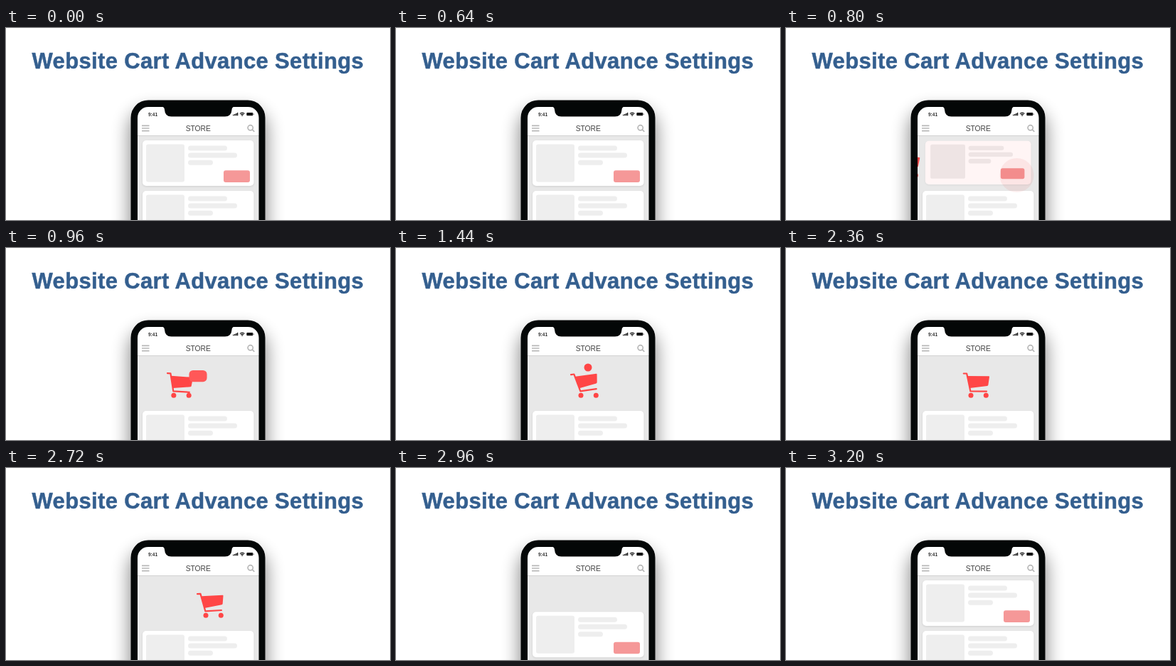
An HTML page that plays this animation: 540x270 px, repeating every 3400 ms.

```html
<!DOCTYPE html>
<html lang="en">
<head>
<meta charset="utf-8">
<title>Website Cart Advance Settings</title>
<style>
  html, body { margin: 0; width: 100%; height: 100%; overflow: hidden; background: #fff; }
  svg { display: block; width: 540px; height: 270px; font-family: "Liberation Sans", Arial, sans-serif; }
  #itemContent { mix-blend-mode: multiply; }
</style>
</head>
<body>
<svg viewBox="0 0 540 270">
  <defs>
    <clipPath id="screen"><rect x="185" y="111" width="170.5" height="200" rx="15"/></clipPath>
    <filter id="glow" x="-40%" y="-40%" width="180%" height="180%"><feGaussianBlur stdDeviation="13"/></filter>
    <filter id="soft" x="-10%" y="-15%" width="120%" height="130%"><feGaussianBlur stdDeviation="1.5"/></filter>
    <g id="content">
      <g fill="#eee">
        <rect x="197" y="163.5" width="54" height="53" rx="3"/>
        <rect x="256" y="165.5" width="55" height="7" rx="3.5"/>
        <rect x="256" y="175.5" width="69" height="7" rx="3.5"/>
        <rect x="256" y="185.8" width="35" height="7" rx="3.5"/>
      </g>
      <rect x="306" y="200.3" width="37" height="16.7" rx="3" fill="#f59898"/>
    </g>
    <g id="card">
      <rect x="192" y="159" width="156.5" height="64" rx="5" opacity=".1" filter="url(#soft)"/>
      <rect x="192" y="158" width="156.5" height="64" rx="5" fill="#fff"/>
      <use href="#content"/>
    </g>
  </defs>

  <text x="36.5" y="57" font-size="31" font-weight="700" letter-spacing=".35" fill="#345f8f" stroke="#345f8f" stroke-width=".5">Website Cart Advance Settings</text>

  <rect x="174" y="116" width="192" height="220" rx="26" opacity=".48" filter="url(#glow)"/>
  <rect x="175.5" y="101.5" width="189" height="220" rx="24.5" fill="#040707"/>

  <g clip-path="url(#screen)">
    <rect x="184" y="110" width="172" height="160" fill="#e8e8e8"/>
    <g id="list">
      <use href="#card" y="71"/>
      <use href="#card" y="142"/>
    </g>
    <rect id="shade" filter="url(#soft)"/>
    <g id="cart" fill="#ff4646">
      <g id="basket">
        <path d="M249.8 176.5H254.2L259.4 201.4L282 201.6" fill="none" stroke="#ff4646" stroke-width="2.2" stroke-linecap="round" stroke-linejoin="round"/>
        <path d="M255.5 180L285.2 180.4Q286.2 180.5 286 181.5L284.4 192.6Q284.2 193.8 283 194L258.5 197Z"/>
      </g>
      <circle cx="260" cy="207.3" r="3.5"/>
      <circle cx="281.3" cy="207.3" r="3.5"/>
    </g>
    <rect id="item"/>
    <use id="itemContent" href="#content"/>
    <circle id="ripple" cx="324.500" cy="207" fill="#e05858"/>

    <rect x="184" y="110" width="172" height="41.5" fill="#fff"/>
    <rect x="184" y="151" width="172" height="1" fill="#d2d2d2"/>
  </g>

  <path d="M218 110Q222.800 110.800 223 115Q223.500 124.500 232.500 124.500H308Q317 124.500 317.500 115Q317.700 110.800 322.500 110Z" fill="#040707"/>
  <text x="200" y="124.300" font-size="6.500" font-weight="700" fill="#333">9:41</text>
  <path d="M319.700 123.300V121.800M321.700 123.300V121M323.700 123.300V120M325.600 123.300V118.900" stroke="#111" stroke-width="1.400"/>
  <g fill="none" stroke="#111" stroke-width="1.200">
    <path d="M329 120.500Q332.200 117.700 335.400 120.500M330.300 122Q332.200 120.400 334.100 122"/>
    <circle cx="332.200" cy="123.100" r=".3"/>
  </g>
  <rect x="338.300" y="119" width="9" height="4.300" rx="1" fill="#111"/>
  <rect x="347.800" y="120.400" width=".8" height="1.600" fill="#555"/>
  <g fill="none" stroke="#b8b8b8" stroke-width="1.700">
    <path d="M191 137.300H201.500M191 141H201.500M191 144.700H201.500"/>
    <circle cx="343.700" cy="140.300" r="3.600"/>
    <path d="M346.300 142.900L349.300 145.900"/>
  </g>
  <text x="270.300" y="144.500" font-size="10.300" text-anchor="middle" fill="#444">STORE</text>
</svg>
<script>
  const LOOP = 3400, STEP = 40;
  const el = id => document.getElementById(id);
  const set = (id, attrs) => {
    for (const name in attrs) el(id).setAttribute(name, attrs[name]);
  };
  const clamp = v => Math.min(1, Math.max(0, v));
  const span = (t, from, to) => clamp((t - from) / (to - from));
  const mix = (a, b, p) => a + (b - a) * p;
  const inOut = (p, n) => p < .5 ? (2 * p) ** n / 2 : 1 - (2 - 2 * p) ** n / 2;

  // [time, degrees] of the basket
  const TILTS = [[640, 4], [960, 3], [1200, 7], [1420, -9], [1600, 3], [1760, -2],
    [1960, 0], [2040, -3.5], [2160, 2], [2280, 0], [2320, 0], [2720, -4], [2920, -8]];

  function tiltAt(t) {
    const i = TILTS.findIndex(key => key[0] > t);
    if (i < 1) return TILTS[i ? TILTS.length - 1 : 0][1];
    const [t0, a] = TILTS[i - 1], [t1, b] = TILTS[i];
    return mix(a, b, inOut(span(t, t0, t1), 2));
  }

  function cartX(t) {
    if (t < 1160) return -99 * ((1160 - t) / 360) ** 2.4;
    if (t < 1400) return 3 * Math.sin(Math.PI * span(t, 1160, 1400));
    return 21 * (Math.max(0, t - 2480) / 240) ** 3;
  }

  // Vertical shift of the ball: drops into the basket, then is tossed once.
  function ballShift(t) {
    if (t < 1307) return 9 * span(t, 1140, 1300) ** 2;
    return Math.min(9, -20.5 + 9.5 * ((t - 1630) / 190) ** 2);
  }

  function draw(t) {
    const p = inOut(span(t, 640, 1140), 5);
    const left = mix(192, 264.5, p), right = mix(348.5, 275.5, p);
    const top = mix(158, 173.5, p), bottom = mix(222, 184.5, p);
    const tint = mix(255, 70, p);
    const box = { x: left, width: right - left, height: bottom - top, rx: mix(5, 5.5, p) };
    set('item', {
      ...box, y: top + ballShift(t), fill: `rgb(255,${tint},${tint})`,
      visibility: t < 1960 ? 'visible' : 'hidden'
    });
    set('shade', { ...box, y: top + 1, opacity: .1 * (1 - span(t, 640, 960)) });

    const scale = Math.max(0, 1 - 1.75 * p);
    set('itemContent', {
      transform: `translate(262 167) scale(${scale}) translate(-262 -167)`,
      opacity: 1 - span(t, 800, 920)
    });
    set('ripple', {
      r: 24 * span(t, 640, 800),
      opacity: .1 * (1 - span(t, 800, 920))
    });

    set('cart', {
      transform: `translate(${cartX(t)} 0)`,
      visibility: t >= 640 && t < 2960 ? 'visible' : 'hidden'
    });
    set('basket', { transform: `rotate(${tiltAt(t)} 259 202)` });
    set('list', { transform: `translate(0 ${-71 * inOut(span(t, 2760, 3200), 3)})` });
  }

  const start = performance.now();
  function frame() {
    const t = (performance.now() - start) % LOOP;
    draw(Math.floor(t / STEP) * STEP);
    requestAnimationFrame(frame);
  }
  frame();
</script>
</body>
</html>
```
